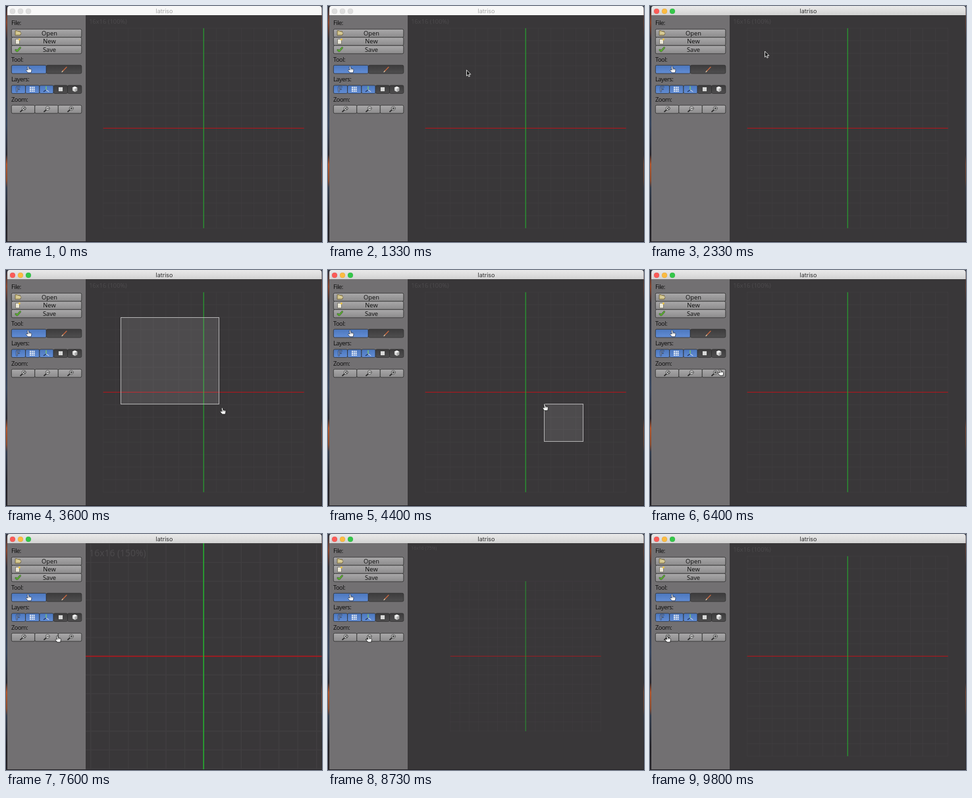
Animation, 480 px wide and 360 px high, one loop 9.94 s. Source, as an HTML page:

```html
<!DOCTYPE html>
<html lang="en">
<head>
<meta charset="utf-8">
<title>latriso</title>
<style>
html, body { margin: 0; width: 100%; height: 100%; overflow: hidden; background: #2b262c; }
svg { display: block; width: 480px; height: 360px; }
text { font: 9.3px "Open Sans", "Noto Sans", sans-serif; fill: #0b0b0b; }
.label { letter-spacing: -.5px; }
.mid { text-anchor: middle; }
#title { font: 9px Inter, Roboto, sans-serif; fill: #303030; }
#size { fill: #4d4b4d; }
.idle #title { fill: #a8a8a8; }
.idle #bar { fill: #f7f7f7; }
.idle .light { fill: #dedede; stroke: #cecece; }
.light { stroke: #0002; stroke-width: .5; }
.line { fill: none; stroke-linecap: round; stroke-linejoin: round; }
</style>
</head>
<body>
<svg id="stage" class="idle" viewBox="0 0 480 360">
  <defs>
    <linearGradient id="desk" x2="0" y2="1">
      <stop offset="0" stop-color="#29303c"/><stop offset=".07" stop-color="#8a4128"/>
      <stop offset=".14" stop-color="#2a2a33"/><stop offset=".5" stop-color="#34435c"/>
      <stop offset=".63" stop-color="#26242b"/><stop offset=".67" stop-color="#b4542a"/>
      <stop offset=".74" stop-color="#8a4a2c"/><stop offset=".77" stop-color="#2f3a4c"/>
      <stop offset=".9" stop-color="#1d1b20"/><stop offset="1" stop-color="#222025"/>
    </linearGradient>
    <linearGradient id="chrome" x2="0" y2="1"><stop stop-color="#eaeaea"/><stop offset="1" stop-color="#d3d3d3"/></linearGradient>
    <linearGradient id="light" x2="0" y2="1"><stop stop-color="#aaa9aa"/><stop offset="1" stop-color="#8c8b8c"/></linearGradient>
    <linearGradient id="blue" x2="0" y2="1"><stop stop-color="#4c77bd"/><stop offset="1" stop-color="#628dd5"/></linearGradient>
    <linearGradient id="dark" x2="0" y2="1"><stop stop-color="#3c3b3c"/><stop offset="1" stop-color="#4f4e4f"/></linearGradient>
    <clipPath id="view"><path d="M121 14H479.5V359H121Z"/></clipPath>
    <g id="hand" class="line">
      <path d="M-1.1 .8Q-.2-.8 .8 .6L1.2 3.3L4.6 4.2Q5.8 5 5.2 7.6L4.6 10H-.1L-3 6.6Q-3.4 4.8-.6 5.6Z" fill="#fff"/>
      <path d="M1.3 3.6V5.6M3 4V5.8" stroke-width=".5"/>
    </g>
    <g id="lens" class="line">
      <path d="M-.9 1.3L-4 4.2" stroke="#292929" stroke-width="1.7"/>
      <circle cx="1.2" cy="-.9" r="3" fill="#d6d6d6" stroke="#444" stroke-width=".8"/>
    </g>
  </defs>

  <path fill="url(#desk)" d="M0 0H480V360H0Z"/>
  <path id="bar" fill="url(#chrome)" d="M2 14V4Q2 0 5.5 0H476Q479.5 0 479.5 4V14Z"/>
  <circle class="light" cx="10" cy="8" r="4" fill="#fc5b57"/>
  <circle class="light" cx="22" cy="8" r="4" fill="#fdbb40"/>
  <circle class="light" cx="34" cy="8" r="4" fill="#34c749"/>
  <text id="title" class="mid" x="240.5" y="11.2">latriso</text>

  <path fill="#727072" d="M2 14H121V359H2Z"/>
  <path fill="#393739" d="M121 14H479.5V359H121Z"/>

  <g clip-path="url(#view)">
    <g id="sheet">
      <path id="grid" class="line" stroke="#403e40" stroke-width=".9"/>
      <path d="M-152.5 0H152.5" stroke="#b8141b"/>
      <path d="M0-152.5V152.5" stroke="#23b42e"/>
    </g>
    <g id="info"><text id="size" y="13"></text></g>
    <rect id="sel" fill="#fff" fill-opacity=".1" stroke="#b2b1b2"/>
  </g>

  <g id="buttons"></g>
  <text class="label" x="8" y="29.3">File:</text>
  <text class="label" x="8" y="84.6">Tool:</text>
  <text class="label" x="8" y="115.2">Layers:</text>
  <text class="label" x="8" y="145.5">Zoom:</text>
  <text class="mid" x="66" y="45">Open</text>
  <text class="mid" x="66" y="57.4">New</text>
  <text class="mid" x="66" y="69.8">Save</text>

  <!-- file icons -->
  <path d="M14 44.8V37.6h3l1 1h3.5v2.2H23.2l-1.7 4Z" fill="#cbbd83" stroke="#5d5130" stroke-width=".7"/>
  <path d="M15.5 41.2H23" stroke="#f0e6bb" stroke-width=".9"/>
  <path d="M14.5 50.5h6v7.5h-6Z" fill="#ece9d9" stroke="#625f55" stroke-width=".7"/>
  <circle cx="20.3" cy="51" r="1.5" fill="#ecc23f"/>
  <path class="line" d="M14.8 67L17 69L21.6 63.6" stroke="#254d16" stroke-width="2.5"/>
  <path class="line" d="M14.8 67L17 69L21.6 63.6" stroke="#68c536" stroke-width="1.4"/>
  <!-- tool icons -->
  <use href="#hand" x="33.5" y="91.8" stroke="#26334d" stroke-width=".8"/>
  <path class="line" d="M86.3 99.2L92 93.3" stroke="#c9683f" stroke-width="1.3"/>
  <path class="line" d="M85 100.7L86.3 99.2" stroke="#ead5b4" stroke-width="1.1"/>
  <!-- layer icons -->
  <path class="line" d="M16.5 130.5V123.6H20.5M16.5 127H19.6" stroke="#1c2c4c" stroke-width="2"/>
  <path class="line" d="M16.5 130.5V123.6H20.5M16.5 127H19.6" stroke="#a9bbdc" stroke-width=".7"/>
  <path d="M36 124.3h7.6M36 127h7.6M36 129.7h7.6" stroke="#edf1f8" stroke-width="1.9" stroke-dasharray="2 .8"/>
  <path class="line" d="M61 128V122.8" stroke="#8ae34c"/>
  <path class="line" d="M61 128L57.4 130.6" stroke="#20345e" stroke-width="1.2"/>
  <path class="line" d="M61 128L65 130.6" stroke="#e3e7ef"/>
  <path d="M79.4 123.4h7.2v7.2h-7.2Z" fill="#d8d8d8" stroke="#222" stroke-width=".7"/>
  <path d="M104.5 122.8l3.8 1.7v4.7l-3.8 2l-3.8-2v-4.7Z" fill="#dedede" stroke="#222" stroke-width=".5"/>
  <path d="M100.7 124.5l3.8 1.8l3.8-1.8l-3.8-1.7Z" fill="#fafafa"/>
  <path d="M104.5 126.3l3.8-1.8v4.7l-3.8 2Z" fill="#ababab"/>
  <!-- zoom icons -->
  <use href="#lens" x="26" y="157"/><use href="#lens" x="62" y="157"/><use href="#lens" x="98" y="157"/>
  <path class="line" d="M28.7 154.6L25.9 156.1L28.7 157.5M61.8 156.1h2.8M97.8 156.1h2.8M99.2 154.7v2.8" stroke="#111" stroke-width=".9"/>

  <rect id="press" y="151.5" width="35.5" height="12" rx="2" fill="#000" fill-opacity=".28"/>
  <g id="cursor">
    <path id="arrow" d="M0 0V9L2 7.2L3.4 10.2L4.9 9.5L3.5 6.6H6.3Z" fill="#111" stroke="#fff" stroke-width=".8"/>
    <use id="point" href="#hand" stroke="#161616" stroke-width=".8"/>
  </g>
</svg>
<script>
const LOOP = 9940, STEP = 1000 / 15, CELL = 19.06;
const $ = id => document.getElementById(id);
const set = (el, attrs) => { for (const k in attrs) el.setAttribute(k, attrs[k]); };
const show = (el, on) => { el.style.display = on ? '' : 'none'; };

// pointer tip: time, x, y
const path = [
  [600, 484, 230], [1400, 205, 95], [1700, 205, 95], [2200, 174.5, 69], [2330, 174.5, 69],
  [2467, 175, 73], [2533, 175, 73], [3533, 324, 205], [3600, 328.5, 210], [3930, 388, 262],
  [4070, 388, 262], [4400, 329, 204.5], [4930, 208, 108], [5800, 208, 108],
  [6530, 97, 155], [7500, 97, 155], [7600, 78, 155], [7730, 61, 155],
  [9000, 61, 155], [9600, 26, 155], [LOOP, 26, 155]
];
// selection drags: from, to, start corner, trailing time
const drags = [[2533, 4000, 175, 73, STEP], [4070, 5060, 388, 262, 0]];
const zooms = [[0, 1], [6720, 1.25], [7190, 1.5], [7990, 1.25], [8320, 1], [8660, .75], [8990, .5], [9660, 1]];
// pressed zoom button: from, to, left edge
const presses = [
  [6660, 6725, 79.5], [6990, 7190, 79.5], [7860, 7990, 44], [8190, 8320, 44],
  [8390, 8520, 44], [8860, 8990, 44], [9660, 9790, 8.5]
];

const during = (list, t) => list.find(([from, to]) => t >= from && t < to);
const snap = v => Math.round(v) - .5;

// Hermite curve through the path points, resting where a point repeats
function slope(i, axis) {
  const a = path[i - 1], b = path[i], c = path[i + 1];
  if (!a || !c || a[axis] === b[axis] || b[axis] === c[axis]) return 0;
  return (c[axis] - a[axis]) / (c[0] - a[0]);
}
function tip(t) {
  const i = Math.max(0, path.findIndex(p => p[0] > t) - 1);
  const a = path[i], b = path[i + 1], span = b[0] - a[0];
  const u = Math.max(0, (t - a[0]) / span), u2 = u * u, u3 = u2 * u;
  return [1, 2].map(k =>
    a[k] * (2 * u3 - 3 * u2 + 1) + b[k] * (3 * u2 - 2 * u3) +
    span * (slope(i, k) * (u3 - 2 * u2 + u) + slope(i + 1, k) * (u3 - u2)));
}

function button(x, y, w, h, fill) {
  const r = document.createElementNS('http://www.w3.org/2000/svg', 'rect');
  set(r, { x, y, width: w, height: h, rx: 2, fill: `url(#${fill})`, stroke: '#2f2f2f', 'stroke-width': .8 });
  $('buttons').append(r);
}
for (let i = 0; i < 3; i++) {
  button(8.3, 35.3 + i * 12.5, 106.5, 12.5, 'light');
  button(8.3 + i * 35.5, 151.3, 35.5, 12.5, 'light');
}
button(8.3, 90.3, 53, 12.7, 'blue');
button(61.3, 90.3, 53.5, 12.7, 'dark');
for (let i = 0; i < 5; i++) button(8.3 + i * 21.3, 121, 21.3, 12.4, i < 3 ? 'blue' : 'dark');

let d = '';
for (let i = -8; i <= 8; i++) {
  const p = i * CELL, e = 8 * CELL;
  d += `M${p} ${-e}V${e}M${-e} ${p}H${e}`;
}
set($('grid'), { d });

function draw(t) {
  $('stage').classList.toggle('idle', t < 1500);

  const zoom = zooms.filter(z => z[0] <= t).pop()[1];
  set($('sheet'), { transform: `translate(300.2 186.4) scale(${zoom})` });
  set($('info'), { transform: `translate(126.2 14) scale(${zoom})` });
  $('size').textContent = `16x16 (${zoom * 100}%)`;

  const [x, y] = tip(t), drag = during(drags, t);
  show($('sel'), drag);
  if (drag) {
    const [from, , x0, y0, lag] = drag;
    const [x1, y1] = tip(Math.max(from, t - lag));
    const left = snap(Math.min(x0, x1)), top = snap(Math.min(y0, y1));
    set($('sel'), {
      x: left, y: top,
      width: snap(Math.max(x0, x1)) - left, height: snap(Math.max(y0, y1)) - top
    });
  }

  const press = during(presses, t);
  show($('press'), press);
  if (press) set($('press'), { x: press[2] });

  const hand = t >= 2530 && t < 5395 || x < 115 && y > 150;
  show($('cursor'), t >= 600);
  show($('point'), hand);
  show($('arrow'), !hand);
  set($('cursor'), { transform: `translate(${x} ${y})` });
}

const start = performance.now();
function tick() {
  const t = (performance.now() - start) % LOOP;
  draw(Math.floor(t / STEP + .05) * STEP);
  requestAnimationFrame(tick);
}
tick();
</script>
</body>
</html>
```
